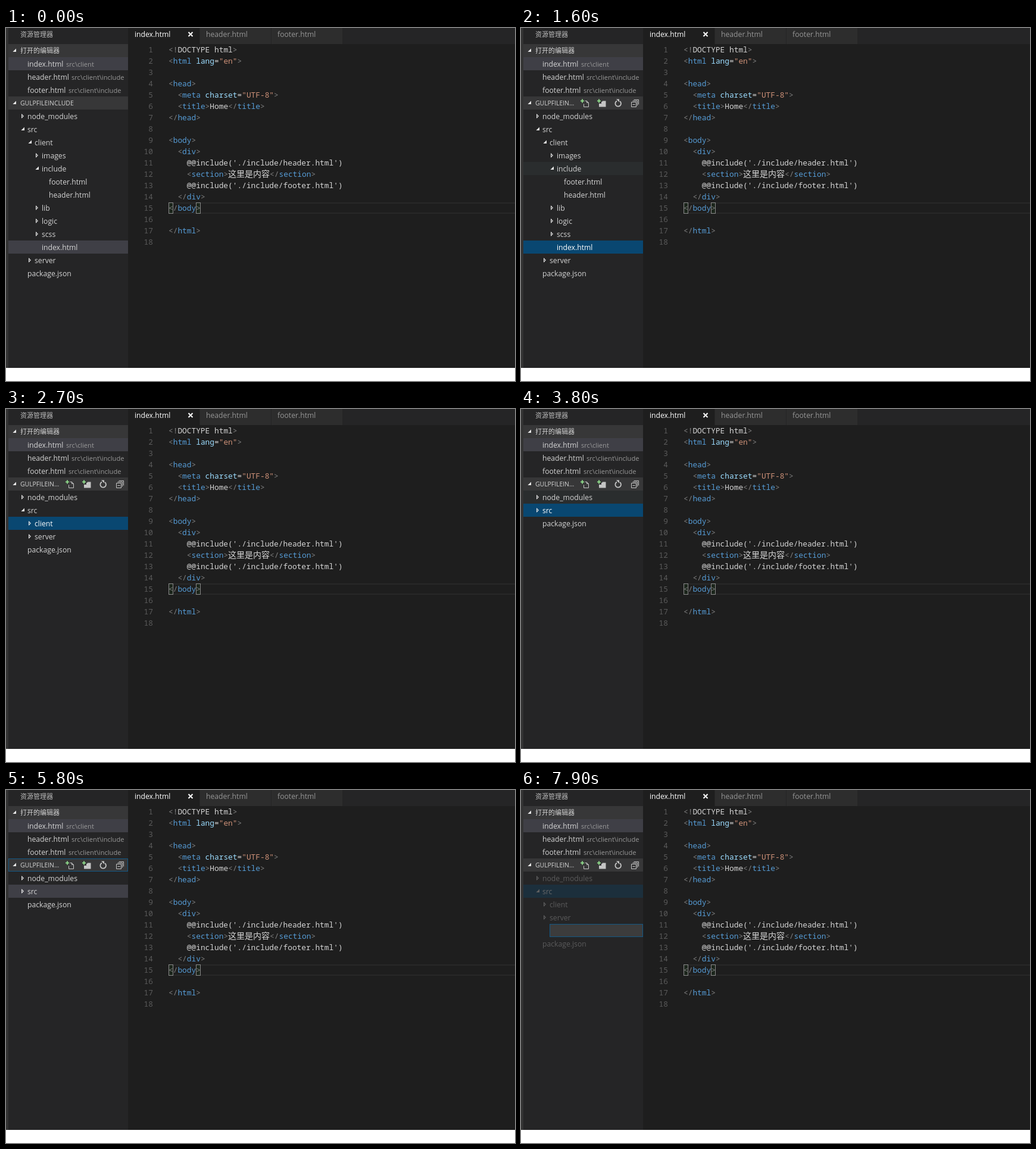
Recreate the animation shown at these times as an HTML page. Size 855 by 593 pixels, loop 8000 ms.

```html
<!DOCTYPE html>
<html lang="zh">
<head>
<meta charset="UTF-8">
<style>
  html, body { margin: 0; width: 100%; height: 100%; overflow: hidden; background: #fff; }
  svg { display: block; }
  text { white-space: pre; font: 12.2px "Open Sans", "Noto Sans CJK SC", sans-serif; }
  .code { font: 12.83px "Noto Sans Mono", monospace; }
  .cjk { font-family: "Noto Sans CJK SC", "Noto Sans CJK JP", sans-serif; }
</style>
</head>
<body>
<svg id="stage" width="855" height="593"><g id="fixed"></g><g id="tree"></g></svg>
<script>
const LOOP = 8000, ROW = 22, LINE = 19, CHAR = 7.7;
const FG = '#d4d4d4', BLUE = '#094771', GREY = '#3f3f46', OUTLINE = '#135784';

const rect = (x, y, w, h, fill, extra = '') =>
  `<rect x="${x}" y="${y}" width="${w}" height="${h}" fill="${fill}" ${extra}/>`;
const frame = (x, y, w, h, fill, stroke) =>
  rect(x + .5, y + .5, w - 1, h - 1, fill, `stroke="${stroke}"`);
const path = (x, y, d, attrs) => `<path transform="translate(${x} ${y})" d="${d}" ${attrs}/>`;
const text = (x, y, s, fill, size, cls = '', anchor = 'start') =>
  `<text x="${x}" y="${y}" fill="${fill}" class="${cls}" text-anchor="${anchor}" ` +
  `${size ? `style="font-size:${size}px"` : ''}>${s.replace(/&/g, '&amp;').replace(/</g, '&lt;')}</text>`;
const twistie = (x, y, open) => path(x, y,
  open ? 'M11 10.07H5.344L11 4.414z' : 'M6 4v8l4-4zm1 2.414L8.586 8 7 9.586z', 'fill="#e8e8e8"');

// ---- editor and static parts of the sidebar ----
const source = `<!DOCTYPE html>
<html lang="en">

<head>
  <meta charset="UTF-8">
  <title>Home</title>
</head>

<body>
  <div>
    @@include('./include/header.html')
    <section>这里是内容</section>
    @@include('./include/footer.html')
  </div>
</body>

</html>
`.split('\n');
const TOKEN = /(<[!\/]?|>)|((?<=<\/?)\w+)|(\w+(?==))|("[^"]*")|\w+|[^<>"\w]+/g;
const COLORS = ['#808080', '#569cd6', '#9cdcfe', '#ce9178'];

function codeLine(line, i) {
  const y = 41 + LINE * i;
  let x = 273, out = text(247, y, String(i + 1), '#5a5a5a', 0, 'code', 'end');
  for (const [token, ...kinds] of line.matchAll(TOKEN)) {
    const wide = /[^\x00-\x7f]/.test(token);
    const color = COLORS[kinds.findIndex(Boolean)] || FG;
    out += text(x, y, token, color, wide ? 14 : 0, wide ? 'cjk' : 'code');
    x += token.length * (wide ? 14 : CHAR);
  }
  return out;
}

function drawFixed() {
  let out = rect(0, 0, 855, 571, '#1e1e1e') + rect(0, 0, 4, 571, '#333') +
    rect(4, 0, 201, 571, '#252526') + rect(325, 0, 530, 27, '#252526') +
    rect(326, 0, 119, 27, '#2d2d2d') + rect(446, 0, 119, 27, '#2d2d2d');
  out += text(216, 15, 'index.html', '#fff') + text(336, 15, 'header.html', '#969696') +
    text(456, 15, 'footer.html', '#969696');
  out += path(306, 6.5, 'M.5 .5l7 7M7.5 .5l-7 7', 'stroke="#fff" stroke-width="2"');

  out += text(24, 15, '资源管理器', '#bbb', 11, 'cjk');
  out += rect(4, 27, 201, ROW, '#373738') + twistie(6, 30, true) +
    text(24, 42, '打开的编辑器', FG, 11, 'cjk') + rect(4, 49, 201, ROW, GREY);
  [['index.html', 101, 'src\\client'], ['header.html', 110, 'src\\client\\include'],
   ['footer.html', 105, 'src\\client\\include']].forEach(([name, x, dir], i) => {
    const y = 65 + ROW * i;
    out += text(36, y, name, FG) + text(x, y, dir, '#999', 11.1);
  });

  out += rect(274, 294, 590, 17, 'none', 'stroke="#282828" stroke-width="2"');
  for (const x of [273, 319]) out += frame(x, 293, 8, LINE, 'rgba(0,100,0,.1)', '#888');
  return out + source.map(codeLine).join('');
}

// ---- file tree ----
const tree = [
  [0, 'node_modules', 1], [0, 'src', 1], [1, 'client', 1], [2, 'images', 1], [2, 'include', 1],
  [3, 'footer.html'], [3, 'header.html'], [2, 'lib', 1], [2, 'logic', 1], [2, 'scss', 1],
  [2, 'index.html'], [1, 'server', 1], [1, ''], [0, 'package.json']
];

// each step changes part of the state
const steps = [
  [0, { open: ['src', 'client', 'include'], selected: 'index.html' }],
  [300, { actions: true, hover: 'images' }],
  [500, { hover: 'include' }],
  [600, { hover: 'footer.html' }],
  [700, { hover: 'include' }],
  [1600, { focus: true }],
  [2000, { open: ['src', 'client'], selected: 'include' }],
  [2200, { hover: 'client' }],
  [2700, { open: ['src'], selected: 'client' }],
  [3100, { hover: 'src' }],
  [3400, { open: [], selected: 'src' }],
  [3800, { hover: 'node_modules' }],
  [5000, { hover: null, focus: false }],
  [5100, { collapsed: true, outline: true }],
  [5700, { outline: false }],
  [5800, { collapsed: false, outline: true }],
  [7300, { outline: false }],
  [7400, { open: ['src'], focus: true, editing: true, caret: true }],
  [7900, { caret: false }]
];

function actionIcons() {
  const line = 'fill="none" stroke="#c5c5c5"';
  const plus = x => path(x, 118, 'M1 4.5h6M4 1.5v6', 'stroke="#89d185" stroke-width="2"');
  return path(99, 118, 'M8.5 4.5h3l3 3v7h-8v-5M11.5 4.5v3h3', line) + plus(99) +
    path(127, 118, 'M4 9v5.5h11.5V4.5H10L9 6H8v3z', 'fill="#c5c5c5"') + plus(127) +
    path(155, 118, 'M11 5a4.8 4.8 0 1 1-5 -.4', line + ' stroke-width="1.8"') +
    path(155, 118, 'M5 1.5h5v5z', 'fill="#c5c5c5"') +
    path(183, 118, 'M2.5 6.5h8v8h-8zM4.5 10.5h4M4.5 4.5h8v8M6.5 2.5h8v8', line);
}

function drawTree(s) {
  let out = rect(4, 115, 201, ROW, '#373738');
  if (s.outline) out += frame(4, 115, 201, ROW, 'none', OUTLINE);
  out += twistie(6, 118, !s.collapsed) +
    text(24, 130, s.actions ? 'GULPFILEIN...' : 'GULPFILEINCLUDE', FG, 10.4);
  if (s.actions) out += actionIcons();
  if (s.collapsed) return out;

  let y = 137, hiddenBelow = Infinity;
  for (const [depth, name, folder] of tree) {
    if (depth > hiddenBelow || (!name && !s.editing)) continue;
    const open = s.open.includes(name), selected = name === s.selected;
    hiddenBelow = folder && !open ? depth : Infinity;
    const x = 36 + 12 * depth;
    if (!name) {
      out += frame(x, y, 205 - x, ROW, '#3c3c3c', OUTLINE);
      if (s.caret) out += rect(51, y + 3, 1, 17, FG);
    } else {
      const back = selected ? (s.focus ? BLUE : GREY) : name === s.hover ? '#2a2d2e' : 'none';
      out += `<g opacity="${s.editing ? .3 : 1}">` + rect(4, y, 201, ROW, back) +
        (folder ? twistie(x - 16, y + 3, open) : '') +
        text(x, y + 16, name, selected && s.focus ? '#fff' : FG) + '</g>';
    }
    y += ROW;
  }
  return out;
}

const fixedLayer = document.getElementById('fixed'), treeLayer = document.getElementById('tree');
fixedLayer.innerHTML = drawFixed();
let shown = 0;
function tick() {
  const t = performance.now() % LOOP;
  const past = steps.filter(([at]) => at <= t);
  if (past.length !== shown) {
    shown = past.length;
    treeLayer.innerHTML = drawTree(Object.assign({}, ...past.map(([, change]) => change)));
  }
  requestAnimationFrame(tick);
}
tick();
</script>
</body>
</html>
```
